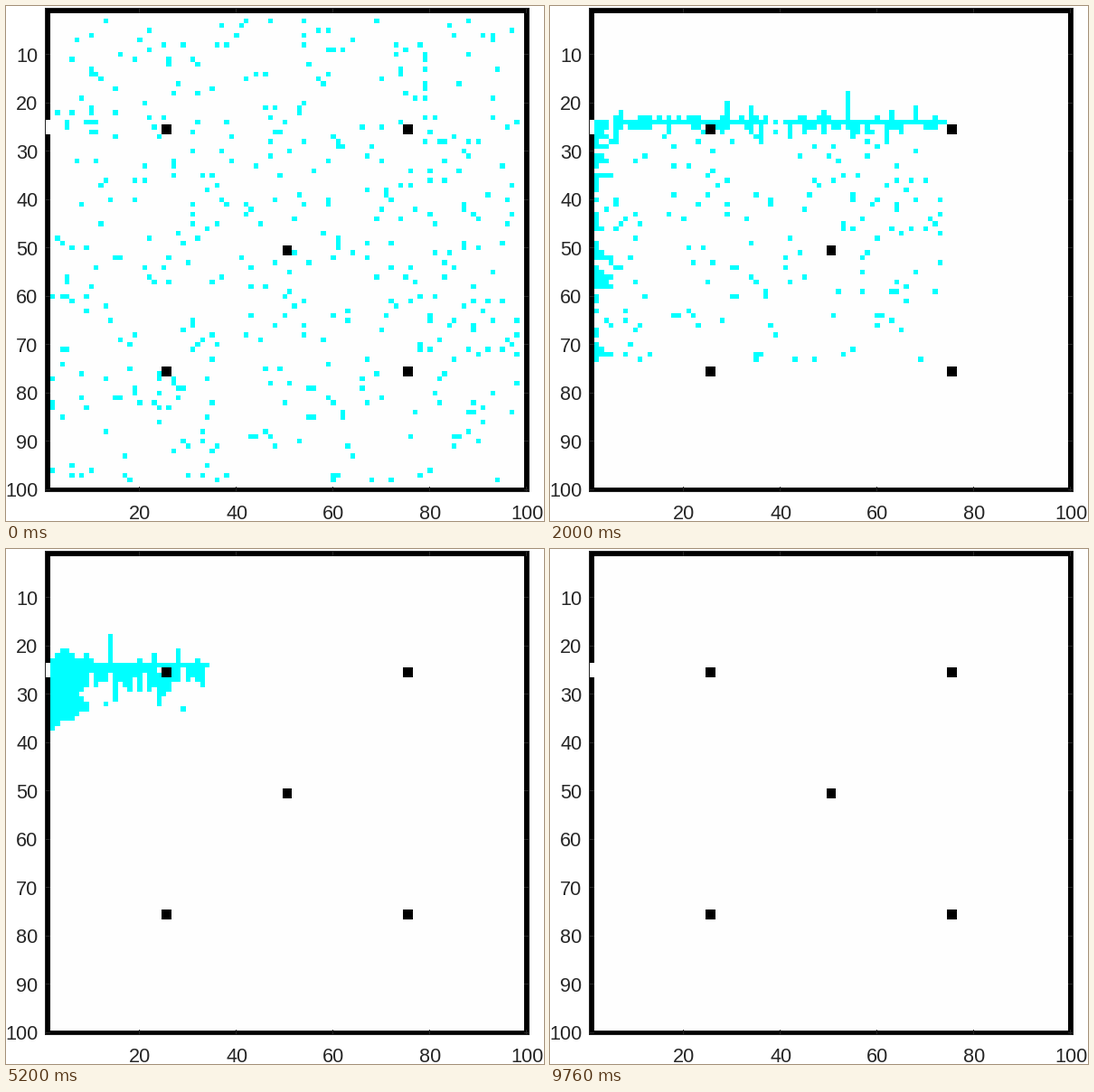
A matplotlib script for the animation above (9.84 s loop, 595 px wide and 570 px high).

```python
import numpy as np
import matplotlib.pyplot as plt
from matplotlib.animation import FuncAnimation

W, H, DPI = 595, 570, 100
FRAMES, STEP_MS = 123, 80
N = 100                          # cells per side
CELL, LEFT, TOP = 5.35, 43.55, 3.0
BOX = (43, 578, 2, 537)          # left, right, top, bottom pixel of the frame
TICK = 6
INK = 38
EMPTY, WALL, PERSON = range(3)
COLORS = np.array([[254, 254, 254], [0, 0, 0], [0, 255, 255]], np.uint8)
DOOR = range(24, 27)
DOOR_REACH = range(24, 28)       # rows beside the door from which people leave
GOAL = (24.4, 1)                 # row, column the crowd heads for


def build_room():
    room = np.zeros((N + 1, N + 1), int)
    room[[1, N], 1:] = WALL
    room[1:, [1, N]] = WALL
    for r, c in ((25, 25), (25, 75), (50, 50), (75, 25), (75, 75)):
        room[r:r + 2, c:c + 2] = WALL
    room[DOOR.start:DOOR.stop, 1] = EMPTY
    return room


def distance(cell):
    return (cell[0] - GOAL[0]) ** 2 + (cell[1] - GOAL[1]) ** 2


def closer_cells(room):
    """For each floor cell, its neighbours nearer the goal, best first."""
    floor = {(r, c) for r in range(2, N) for c in range(2, N)
             if room[r, c] == EMPTY}
    closer = {}
    for r, c in floor:
        around = [(r + dr, c + dc) for dr in (-1, 0, 1) for dc in (-1, 0, 1)]
        closer[r, c] = sorted((p for p in around if p in floor
                               and distance(p) < distance((r, c))),
                              key=distance)
    return closer


def seat_order(closer):
    """Starting cells: one queue in a column, then random floor cells."""
    rng = np.random.default_rng(12)
    queue_col = 79
    queue = [(r, queue_col) for r in (10, 11, 13, 16, 17, 19, 23)]
    cells = [(r, c) for r, c in sorted(closer)
             if 3 <= r <= 98 and c <= 98 and not (c == queue_col and r < 25)]
    return queue + [cells[i] for i in rng.permutation(len(cells))]


def step(crowd, closer):
    """Nearest people move first, each to the best free neighbouring cell."""
    taken = set(crowd)
    moved = []
    for cell in sorted(crowd, key=distance):
        taken.discard(cell)
        if cell[1] == 2 and cell[0] in DOOR_REACH:
            continue
        best = next((p for p in closer[cell] if p not in taken), cell)
        taken.add(best)
        moved.append(best)
    return moved


def simulate(crowd, closer):
    history = [crowd]
    for _ in range(FRAMES - 1):
        history.append(step(history[-1], closer))
    return history


def fitting_run(closer):
    """The largest crowd that has left the room by the last frame."""
    seats = seat_order(closer)
    for size in range(490, 300, -2):
        history = simulate(seats[:size], closer)
        if not history[-1]:
            break
    return history


def pixel_cells(size, start):
    """Cell index under each pixel; 0 is the blank margin."""
    index = np.floor((np.arange(size) + 0.5 - start) / CELL).astype(int) + 1
    return np.where((index >= 1) & (index <= N), index, 0)


def tick_at(value, start):
    return start + (value - 0.5) * CELL


def frame_mask():
    """Pixels of the axes box and its inward ticks."""
    mask = np.zeros((H, W), bool)
    x0, x1, y0, y1 = BOX
    mask[y0:y1 + 1, [x0, x1]] = True
    mask[[y0, y1], x0:x1 + 1] = True
    for value in range(10, N + 1, 10):
        y = int(tick_at(value, TOP))
        mask[y, x0:x0 + TICK] = mask[y, x1 - TICK + 1:x1 + 1] = True
        if value % 20 == 0:
            x = int(tick_at(value, LEFT))
            mask[y0:y0 + TICK, x] = mask[y1 - TICK + 1:y1 + 1, x] = True
    return mask


room = build_room()
closer = closer_cells(room)
history = fitting_run(closer)
rows, cols = pixel_cells(H, TOP), pixel_cells(W, LEFT)
margin = (rows[:, None] == 0) | (cols[None, :] == 0)
box = frame_mask()


def render(frame):
    grid = room.copy()
    for cell in history[frame]:
        grid[cell] = PERSON
    image = COLORS[grid[np.ix_(rows, cols)]]
    image[margin] = 255
    image[box] = INK
    return image


def draw_labels(ax):
    font = dict(family="Liberation Sans", size=15.6, color="#262626",
                va="baseline")
    for value in range(10, N + 1, 10):
        ax.text(35.5, tick_at(value, TOP) + 8, str(value), ha="right", **font)
        if value % 20 == 0:
            ax.text(tick_at(value, LEFT) + 0.3, 567.5, str(value),
                    ha="center", **font)


fig = plt.figure(figsize=(W / DPI, H / DPI), dpi=DPI, facecolor="white")
ax = fig.add_axes([0, 0, 1, 1])
ax.axis("off")
picture = ax.imshow(render(0), extent=(0, W, H, 0),
                    interpolation="nearest", aspect="auto")
draw_labels(ax)


def update(frame):
    picture.set_data(render(frame))
    return (picture,)


anim = FuncAnimation(fig, update, frames=FRAMES, interval=STEP_MS,
                     repeat=True, repeat_delay=0)
plt.show()
```
